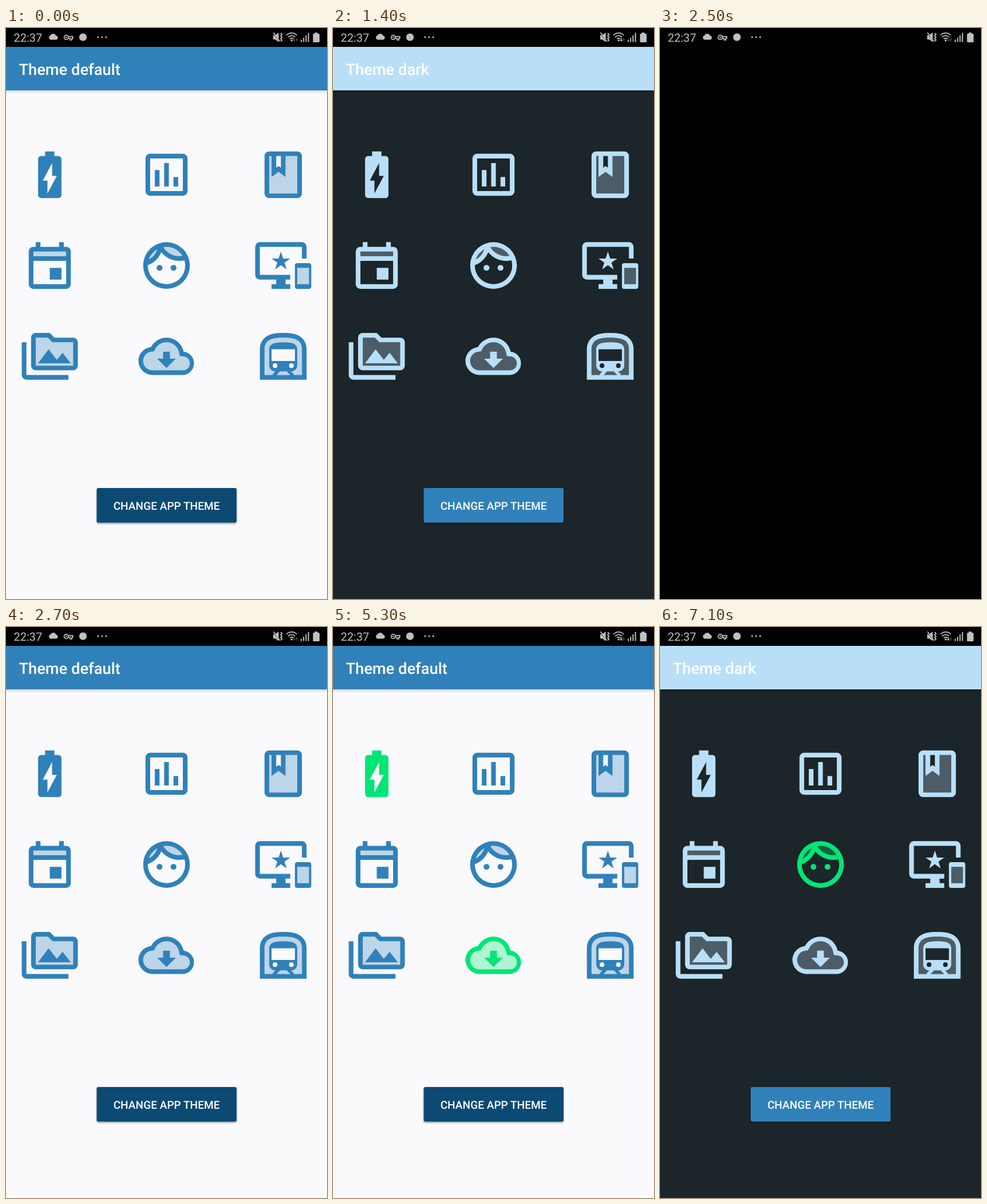
Recreate the animation shown at these times as an HTML page. Size 561 by 998 pixels, loop 8 s.

```html
<!DOCTYPE html>
<html lang="en">
<head>
<meta charset="utf-8">
<title>Theme switch</title>
<style>
  html, body { margin: 0; width: 100%; height: 100%; overflow: hidden; background: #000; }
  svg { display: block; }
  text { font-family: Roboto, "Open Sans", sans-serif; text-rendering: geometricPrecision; }
  #app { --bg: #faf9fc; --main: #3081b9; --button: #0d4a73; --shade: .13; }
  #app.dark { --bg: #1c2529; --main: #b9dff8; --button: #3081b9; --shade: .2; }
  .icon { fill: var(--main); fill-rule: evenodd; }
  .icon.on { fill: #00e676; }
  .tint { opacity: .3; }
  .title { font-size: 27.3px; font-weight: 500; fill: #fff; }
  .label { font-size: 19.1px; font-weight: 500; fill: #fff; text-anchor: middle; }
  #status { fill: #c0c0c0; }
  .line { fill: none; stroke: #c0c0c0; stroke-width: 1.8; }
</style>
</head>
<body>
<svg width="561" height="998" viewBox="0 0 561 998">
  <defs>
    <linearGradient id="fall" x2="0" y2="1">
      <stop offset="0" stop-opacity="1"/><stop offset="1" stop-opacity="0"/>
    </linearGradient>
    <filter id="soft" x="-10%" y="-30%" width="120%" height="160%"><feGaussianBlur stdDeviation="1.6"/></filter>
  </defs>
  <rect width="561" height="998"/>

  <g id="app">
    <rect y="33" width="561" height="965" fill="var(--bg)"/>
    <rect y="109" width="561" height="6" fill="url(#fall)" opacity="var(--shade)"/>
    <rect y="33" width="561" height="76" fill="var(--main)"/>
    <text id="title" class="title" x="22.4" y="81.5"></text>
    <g id="icons"></g>
    <rect x="158.5" y="806" width="244.5" height="60.5" rx="3" opacity=".35" filter="url(#soft)"/>
    <rect x="158.5" y="804" width="244.5" height="60.5" rx="3" fill="var(--button)"/>
    <text class="label" x="280.6" y="841.5">CHANGE APP THEME</text>
  </g>

  <g id="status">
    <text x="13.5" y="24" font-size="20">22:37</text>
    <path d="M78 20.5a4 4 0 0 1-.4-7.6 5.4 5.4 0 0 1 9.8 .5 3.6 3.6 0 0 1 .2 7.1z"/>
    <circle class="line" cx="105.3" cy="16.4" r="3.7"/>
    <circle cx="105.3" cy="16.4" r="1.3"/>
    <path class="line" d="M109 14.8h7.6v3.4h-1.6v2.6h-3v-2.6h-3"/>
    <circle cx="134.5" cy="16" r="6.6"/>
    <circle cx="161" cy="16" r="1.6"/><circle cx="168" cy="16" r="1.6"/><circle cx="175" cy="16" r="1.6"/>
    <path d="M467 12.5h3.5l6-4.5v16.5l-6-4.5H467z"/>
    <path d="M466.5 8.5l12 15" stroke="#000" stroke-width="1.5"/>
    <path class="line" d="M467.5 8l11 15.5M480 9l2.4 2.4-2.4 2.4 2.4 2.4-2.4 2.4 2.4 2.4-2.4 2.4" stroke-width="1.6"/>
    <path class="line" d="M490 12.6q9.2-8 18.4 0M493 16q6.2-5.2 12.4 0M496 19q3.2-2.6 6.4 0"/>
    <circle cx="499.2" cy="21.8" r="1.7"/>
    <path id="down" d="M503 18h1.6v3h1.6l-2.4 3.2-2.4-3.2h1.6z"/>
    <path d="M507.4 24h1.6v-3h1.6l-2.4-3.2-2.4 3.2h1.6z" fill="#464650"/>
    <path d="M515 20.5h2v4h-2zM519.2 17h2v7.500h-2zM523.4 12.800h2v11.700h-2zM527.600 8.500h2v16h-2z"/>
    <path d="M539.500 8h5v2h2q1.500 0 1.500 1.500v12q0 1.500-1.500 1.500h-8.500q-1.500 0-1.500-1.500v-12q0-1.500 1.500-1.500h1.500z"/>
  </g>
</svg>
<script>
const $ = id => document.getElementById(id);

// [solid path, tinted path] on a 24-unit grid, row by row
const icons = [
  ["M15.67 4H14V2h-4v2H8.33C7.6 4 7 4.6 7 5.33v15.33C7 21.4 7.6 22 8.33 22h7.33c.74 0 1.34-.6 1.34-1.33V5.33C17 4.6 16.4 4 15.67 4zM11 20v-5.5H9L13 7v5.5h2z"],
  ["M7 10h2v7H7zM11 7h2v10h-2zM15 13h2v4h-2zM5 5v14h14V5zM5 3h14a2 2 0 0 1 2 2v14a2 2 0 0 1-2 2H5a2 2 0 0 1-2-2V5a2 2 0 0 1 2-2z"],
  ["M6 2h12a2 2 0 0 1 2 2v16a2 2 0 0 1-2 2H6a2 2 0 0 1-2-2V4a2 2 0 0 1 2-2zM9 4v5l1-.75L11 9V4zM18 20V4h-5v9l-3-2.25L7 13V4H6v16z",
   "M18 20V4h-5v9l-3-2.25L7 13V4H6v16z"],
  ["M19 4h-1V2h-2v2H8V2H6v2H5a2 2 0 0 0-2 2v14a2 2 0 0 0 2 2h14a2 2 0 0 0 2-2V6a2 2 0 0 0-2-2zM19 20H5V10h14zM19 8H5V6h14zM12 13h5v5h-5z",
   "M5 6h14v2H5z"],
  ["M7.75 13a1.25 1.25 0 0 1 2.5 0 1.25 1.25 0 0 1-2.5 0zM13.75 13a1.25 1.25 0 0 1 2.5 0 1.25 1.25 0 0 1-2.5 0zM22 12a10 10 0 0 1-20 0 10 10 0 0 1 20 0zM10.66 4.12C12.06 6.44 14.6 8 17.5 8c.46 0 .91-.05 1.34-.12C17.44 5.56 14.9 4 12 4c-.46 0-.91.05-1.34.12zM4.42 9.47c1.71-.97 3.03-2.55 3.66-4.44C6.37 6 5.05 7.58 4.42 9.47zM20 12c0-.78-.12-1.53-.33-2.24-.7.15-1.42.24-2.17.24-3.13 0-5.92-1.44-7.76-3.69C8.69 8.87 6.6 10.88 4 11.86V12a8 8 0 0 0 16 0z",
   "M10.66 4.12C12.06 6.44 14.6 8 17.5 8c.46 0 .91-.05 1.34-.12C17.44 5.56 14.9 4 12 4c-.46 0-.91.05-1.34.12zM4.42 9.47c1.71-.97 3.03-2.55 3.66-4.44C6.37 6 5.05 7.58 4.42 9.47z"],
  ["M18 11h5a1 1 0 0 1 1 1v9a1 1 0 0 1-1 1h-5a1 1 0 0 1-1-1v-9a1 1 0 0 1 1-1zM23 20v-7h-5v7zM20 2H2a2 2 0 0 0-2 2v12a2 2 0 0 0 2 2h7v2H7v2h8v-2h-2v-2h2v-2H2V4h18v5h2V4a2 2 0 0 0-2-2zM11.970 9L11 6l-.97 3H7l2.470 1.760-.94 2.910L11 11.870l2.470 1.800-.94-2.910L15 9z",
   "M18 13h5v7h-5z"],
  ["M2 6H0v14a2 2 0 0 0 2 2h18v-2H2zM22 4h-8l-2-2H6a2 2 0 0 0-2 2v12a2 2 0 0 0 2 2h16a2 2 0 0 0 2-2V6a2 2 0 0 0-2-2zM22 16H6V4h5.170l2 2H22zM7 15l4.500-6 3.500 4.510 2.500-3.010L21 15z",
   "M22 16H6V4h5.170l2 2H22z"],
  ["M19.350 10.040C18.670 6.590 15.640 4 12 4 9.110 4 6.600 5.640 5.350 8.040 2.340 8.360 0 10.910 0 14a6 6 0 0 0 6 6h13a5 5 0 0 0 .35-9.960zM19 18H6c-2.210 0-4-1.790-4-4 0-2.050 1.530-3.760 3.560-3.970l1.070-.11.5-.95C8.080 7.140 9.940 6 12 6c2.620 0 4.880 1.860 5.390 4.430l.3 1.500 1.530.11c1.560.1 2.780 1.410 2.780 2.960a3 3 0 0 1-3 3zM13.450 10h-2.900v3H8l4 4 4-4h-2.550z",
   "M19 18H6c-2.210 0-4-1.790-4-4 0-2.050 1.530-3.760 3.560-3.970l1.070-.11.5-.95C8.080 7.140 9.940 6 12 6c2.620 0 4.880 1.860 5.390 4.430l.3 1.500 1.530.11c1.560.1 2.780 1.410 2.780 2.960a3 3 0 0 1-3 3z"]
];

// The subway reuses its tunnel and train outlines in both layers
const tunnel = "M4 20V8.860c0-2 1-3.450 2.930-4.200C8.400 4.080 10.200 4 12 4s3.600.08 5.070.66C19 5.410 20 6.860 20 8.860V20z";
const train = "M18 15.880c0 1.450-1.180 2.620-2.630 2.620l1.130 1.120V20H15l-1.500-1.500h-2.830L9.170 20H7.500v-.38l1.120-1.120C7.180 18.500 6 17.320 6 15.880V9c0-2.630 3-3 6-3 3.320 0 6 .38 6 3z";
icons.push([
  "M17.800 2.800C16 2.090 13.860 2 12 2s-4 .09-5.800.8C3.530 3.840 2 6.050 2 8.860V22h20V8.860c0-2.810-1.530-5.020-4.200-6.060z" + tunnel + train +
  "M7 9h10v5H7zM7.500 16a1 1 0 0 1 2 0 1 1 0 0 1-2 0zM14.500 16a1 1 0 0 1 2 0 1 1 0 0 1-2 0z",
  tunnel + train
]);

$("icons").innerHTML = icons.map(([solid, tint = ""], i) => {
  const x = 27.5 + i % 3 * 204, y = 207.5 + Math.floor(i / 3) * 158.65;
  return `<g class="icon" transform="translate(${x} ${y}) scale(4.083)">
    <path class="tint" d="${tint}"/><path d="${solid}"/></g>`;
}).join("");
const cells = [...$("icons").children];

const [BATTERY, FACE, CLOUD] = [0, 4, 7];
const blackouts = [[1000, 1400], [2400, 2700], [6100, 6400]];
const taps = [[BATTERY, 3500, 6200], [CLOUD, 5300, 6200], [FACE, 7100, 8000]];
const within = (t, from, to) => t >= from && t < to;

function draw(t) {
  const dark = within(t, 1400, 2700) || t >= 6400;
  const out = blackouts.find(([from, to]) => within(t, from, to));
  $("app").setAttribute("class", dark ? "dark" : "");
  $("app").setAttribute("opacity", !out ? 1 : t < out[0] + 100 ? 0.45 : 0);
  $("title").textContent = dark ? "Theme dark" : "Theme default";
  for (const [i, from, to] of taps) cells[i].classList.toggle("on", within(t, from, to));
  const busy = within(t, 1000, 1700) || t >= 4700;
  $("down").setAttribute("fill", busy ? "#c0c0c0" : "#464650");
}

const start = performance.now();
function tick() {
  draw((performance.now() - start) % 8000);
  requestAnimationFrame(tick);
}
tick();
</script>
</body>
</html>
```
